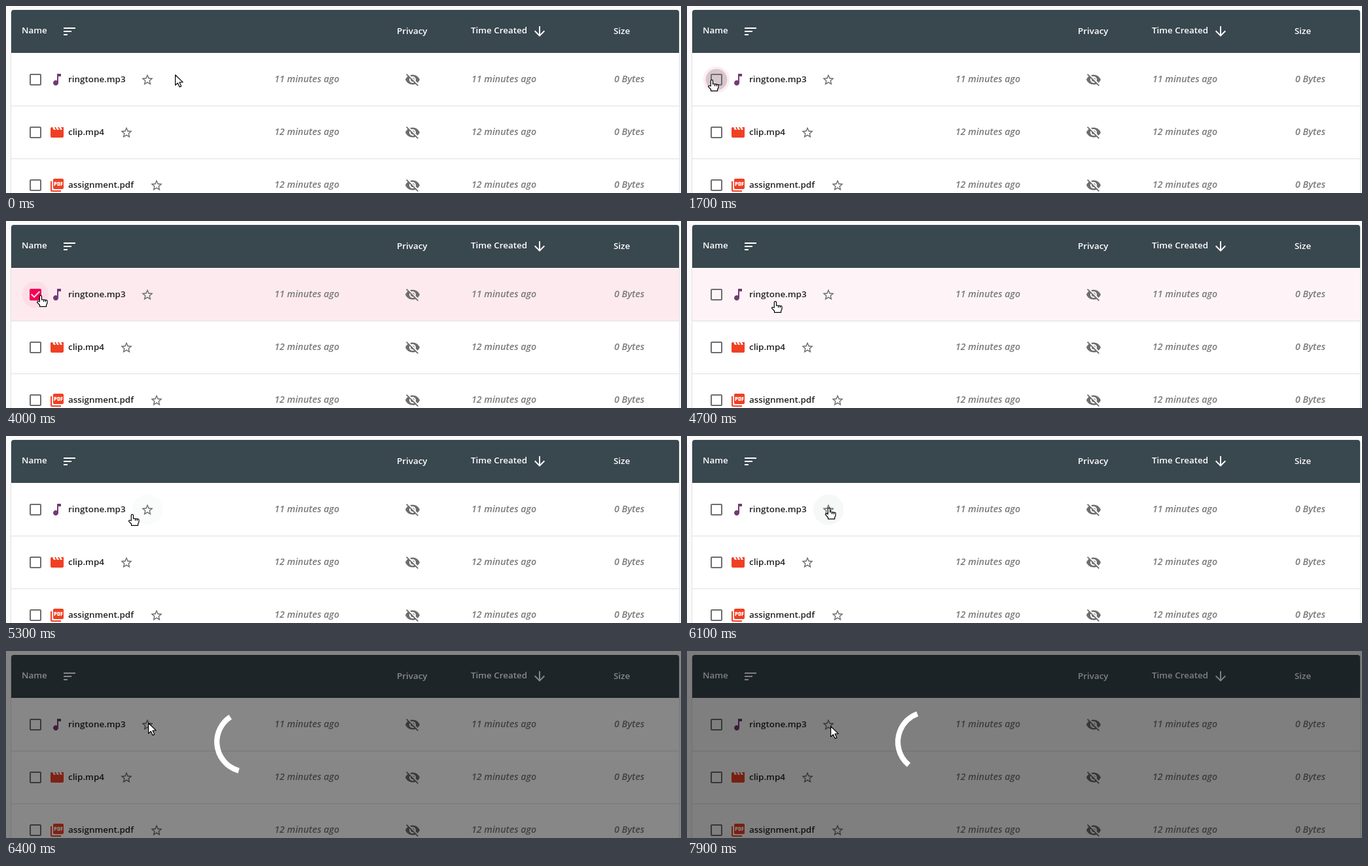
Write an HTML page that moves like this. It is 1031 px wide and 287 px high and loops after 8000 ms.

```html
<!DOCTYPE html>
<html lang="en">
<head>
<meta charset="utf-8">
<title>File list</title>
<style>
  html, body { margin: 0; width: 100%; height: 100%; overflow: hidden; background: #fafafa; }
  svg { display: block; }
  text { font: 600 13.4px "Open Sans", "Noto Sans", sans-serif; fill: #212121; }
  .head { fill: #fff; }
  .muted { font-size: 14.2px; font-style: italic; fill: #7a7a7a; }
  .icon { fill: #6e6e6e; }
</style>
</head>
<body>
<svg id="stage" width="1031" height="287" viewBox="0 0 1031 287">
  <rect x="7.5" y="6.5" width="1021" height="300" rx="4" fill="#fff" stroke="#e2e2e2"/>
  <path d="M8 72V10a4 4 0 0 1 4-4H1024a4 4 0 0 1 4 4V72z" fill="#39474f"/>
  <rect id="selectedRow" x="8" y="73" width="1020" height="80" fill="#fdeaef"/>
  <path d="M8 153.5H1028M8 234.5H1028" stroke="#e0e0e0"/>
  <circle id="checkHalo" cx="45" cy="113" r="20.5" fill="#f50057"/>
  <circle id="checkRipple" cx="45" cy="113"/>
  <circle id="starHalo" cx="216" cy="113" r="23.5" fill="#0a3c3c"/>
  <circle id="starRipple" cx="216" cy="113" fill="#000"/>
  <g id="content"></g>
  <g id="overlay">
    <rect width="1031" height="287" opacity=".5"/>
    <circle id="spinner" cx="368" cy="139.5" r="45.9" fill="none" stroke="#fff" stroke-width="8.2" pathLength="126.92"/>
  </g>
  <g fill="#fff" stroke="#000" stroke-width="1.2" stroke-linejoin="round">
    <path id="arrow" d="M.6 .8V16.6l3.7-3.4 2.8 6.1 2.6-1.2-2.7-5.9 5.1-.3z"/>
    <path id="hand" d="M-1.7 10V1.9a1.6 1.6 0 0 1 3.2 0V7q1.5-1 3 0 1.5-.6 2.8 .4 2.7-.5 2.7 1.8V12l-1.4 3v2.3H-1.5V15L-5.4 10.8q-.4-2.6 3.7-.8zM4.5 7v3M7.3 7.4v2.8"/>
  </g>
</svg>
<script>
const icons = {
  box: "M19 5v14H5V5h14m0-2H5c-1.1 0-2 .9-2 2v14c0 1.1.9 2 2 2h14c1.1 0 2-.9 2-2V5c0-1.1-.9-2-2-2z",
  checked: "M19 3H5c-1.1 0-2 .9-2 2v14c0 1.1.9 2 2 2h14c1.1 0 2-.9 2-2V5c0-1.1-.9-2-2-2zm-9 14l-5-5 1.41-1.41L10 14.17l7.59-7.59L19 8l-9 9z",
  note: "M12 3v10.55c-.59-.34-1.27-.55-2-.55-2.21 0-4 1.79-4 4s1.79 4 4 4 4-1.79 4-4V7h4V3h-6z",
  movie: "M18 4l2 4h-3l-2-4h-2l2 4h-3l-2-4H8l2 4H7L5 4H4c-1.1 0-2 .9-2 2v12c0 1.1.9 2 2 2h16c1.1 0 2-.9 2-2V4h-4z",
  pdf: "M20 2H8c-1.1 0-2 .9-2 2v12c0 1.1.9 2 2 2h12c1.1 0 2-.9 2-2V4c0-1.1-.9-2-2-2zm-8.5 7.5c0 .83-.67 1.5-1.5 1.5H9v2H7.5V7H10c.83 0 1.5.67 1.5 1.5v1zm5 2c0 .83-.67 1.5-1.5 1.5h-2.5V7H15c.83 0 1.5.67 1.5 1.5v3zm4-3H19v1h1.5V11H19v2h-1.5V7h3v1.5zM9 9.5h1v-1H9v1zM4 6H2v14c0 1.1.9 2 2 2h14v-2H4V6zm10 5.5h1v-3h-1v3z",
  star: "M22 9.24l-7.19-.62L12 2 9.19 8.63 2 9.24l5.46 4.73L5.82 21 12 17.27 18.18 21l-1.63-7.03L22 9.24zM12 15.4l-3.76 2.27 1-4.28-3.32-2.88 4.38-.38L12 6.1l1.71 4.04 4.38.38-3.32 2.88 1 4.28L12 15.4z",
  hidden: "M12 7c2.76 0 5 2.24 5 5 0 .65-.13 1.26-.36 1.83l2.92 2.92c1.51-1.26 2.7-2.89 3.43-4.75-1.73-4.39-6-7.5-11-7.5-1.4 0-2.74.25-3.98.7l2.16 2.16C10.74 7.13 11.35 7 12 7zM2 4.27l2.74 2.74C3.08 8.3 1.78 10.02 1 12c1.73 4.39 6 7.5 11 7.5 1.55 0 3.03-.3 4.38-.84l3.35 3.34L21 20.73 3.27 3 2 4.27zM7.53 9.8l1.55 1.55c-.05.21-.08.43-.08.65 0 1.66 1.34 3 3 3 .22 0 .44-.03.65-.08l1.55 1.55c-.67.33-1.41.53-2.2.53-2.76 0-5-2.24-5-5 0-.79.2-1.53.53-2.2zm4.31-.78l3.15 3.15.02-.16c0-1.66-1.34-3-3-3l-.17.01z",
  sort: "M3 18h6v-2H3v2zM3 6v2h18V6H3zm0 7h12v-2H3v2z",
  down: "M20 12l-1.41-1.41L13 16.17V4h-2v12.17l-5.58-5.59L4 12l8 8 8-8z"
};
const $ = id => document.getElementById(id);
const text = (x, y, label, cls = "") => `<text x="${x}" y="${y}" class="${cls}">${label}</text>`;

// Icons live on a 24-unit grid and are placed by their centre.
const icon = (name, x, y, { fill = "#6e6e6e", scale = 1, id = "" } = {}) =>
  `<path id="${id}" d="${icons[name]}" fill="${fill}" transform="translate(${x} ${y}) scale(${scale}) translate(-12 -12)"/>`;

const row = (y, file, type, fill, starX, age, boxId = "") =>
  icon("box", 45, y, { id: boxId }) +
  icon(type, 78, y, { fill }) +
  text(95, y + 4, file) +
  icon("star", starX, y + .3, { scale: .88 }) +
  icon("hidden", 621, y) +
  text(410, y + 4, age, "muted") + text(711, y + 4, age, "muted") + text(929, y + 4, "0 Bytes", "muted");

$("content").innerHTML =
  text(24, 42, "Name", "head") + icon("sort", 97, 39, { fill: "#fff" }) +
  text(597, 43, "Privacy", "head") +
  text(710, 42, "Time Created", "head") + icon("down", 815, 39, { fill: "#fff" }) +
  text(928, 43, "Size", "head") +
  row(113, "ringtone.mp3", "note", "#733a72", 216, "11 minutes ago", "emptyBox") +
  icon("checked", 45, 113, { fill: "#f50057", id: "checkedBox" }) +
  row(194, "clip.mp4", "movie", "#f04024", 184, "12 minutes ago") +
  row(275, "assignment.pdf", "pdf", "#f04024", 230, "12 minutes ago");

// Pointer path: time, x, y
const path = [
  [0, 258, 105], [300, 258, 105], [500, 220, 113], [800, 90, 118], [1000, 37, 112], [1100, 37, 112],
  [1200, 38, 113], [2100, 38, 113], [2400, 70, 116], [2500, 70, 116], [2700, 84, 124], [2900, 84, 124],
  [3000, 92, 134], [3100, 92, 134], [3500, 62, 119], [3800, 53, 114], [4300, 53, 114],
  [4800, 155, 125], [5300, 193, 120], [5700, 218, 110], [6200, 217, 110], [6900, 217, 110],
  [7100, 219, 115], [8000, 219, 115]
];
const handTimes = [[500, 600], [800, 2300], [3500, 4500], [4700, 6300]];

const clamp = v => Math.min(1, Math.max(0, v));
const ramp = (t, from, to) => clamp((t - from) / (to - from));
const within = (t, from, to) => t >= from && t < to;
const ease = x => x * x * (3 - 2 * x);
const fade = (id, value) => $(id).setAttribute("opacity", value);

function ripple(id, t, start, release, end, radius, strength) {
  $(id).setAttribute("r", radius * (.4 + .6 * ramp(t, start, release + 100)));
  fade(id, within(t, start, end) ? strength * (1 - ramp(t, release, end)) : 0);
}

function drawPointer(t) {
  const i = path.findIndex(point => point[0] > t);
  const [a, b] = [path[i - 1], path[i]];
  const k = ramp(t, a[0], b[0]);
  const [x, y] = [1, 2].map(n => Math.round(a[n] + (b[n] - a[n]) * k));
  const isHand = handTimes.some(([from, to]) => within(t, from, to));
  for (const id of ["arrow", "hand"]) $(id).setAttribute("transform", `translate(${x} ${y})`);
  fade("hand", isHand ? 1 : 0);
  fade("arrow", isHand ? 0 : 1);
}

function drawSpinner(t) {
  fade("overlay", t < 6300 ? 0 : t < 6400 ? .38 : t < 6500 ? .94 : 1);
  const elapsed = Math.max(t, 6330) - 6400;
  const turn = .24 + elapsed / 1400;
  const phase = (.235 + elapsed / 1520) % 1;
  const grow = ease(clamp(phase * 2));
  const slide = ease(clamp(phase * 2 - 1));
  const spinner = $("spinner");
  spinner.setAttribute("stroke-dasharray", `${1 + 99 * grow} 200`);
  spinner.setAttribute("stroke-dashoffset", -(15 * grow + 110 * slide));
  spinner.setAttribute("transform", `rotate(${turn * 360} 368 139.5)`);
}

function draw(t) {
  const checked = within(t, 2600, 4700);
  fade("checkedBox", checked ? 1 : 0);
  fade("emptyBox", checked ? 0 : 1);
  fade("selectedRow", t < 4700 ? ramp(t, 2500, 2700) : 1 - ramp(t, 4600, 4800));

  fade("checkHalo", within(t, 1500, 1900) ? .07 : within(t, 3500, 4500) ? .05 : 0);
  $("checkRipple").setAttribute("fill", t < 2600 ? "#000" : "#f50057");
  if (t < 2600) ripple("checkRipple", t, 1500, 1700, 1900, 20.5, .16);
  else ripple("checkRipple", t, 4100, 4300, 4500, 20.5, .16);

  fade("starHalo", within(t, 4900, 5800) ? .018 : within(t, 5800, 6400) ? .035 : 0);
  ripple("starRipple", t, 5800, 5900, 6100, 23.5, .14);

  drawSpinner(t);
  drawPointer(t);
}

function tick(now) {
  draw(Math.floor((now % 8000) / 100) * 100);
  requestAnimationFrame(tick);
}
draw(0);
requestAnimationFrame(tick);
</script>
</body>
</html>
```
